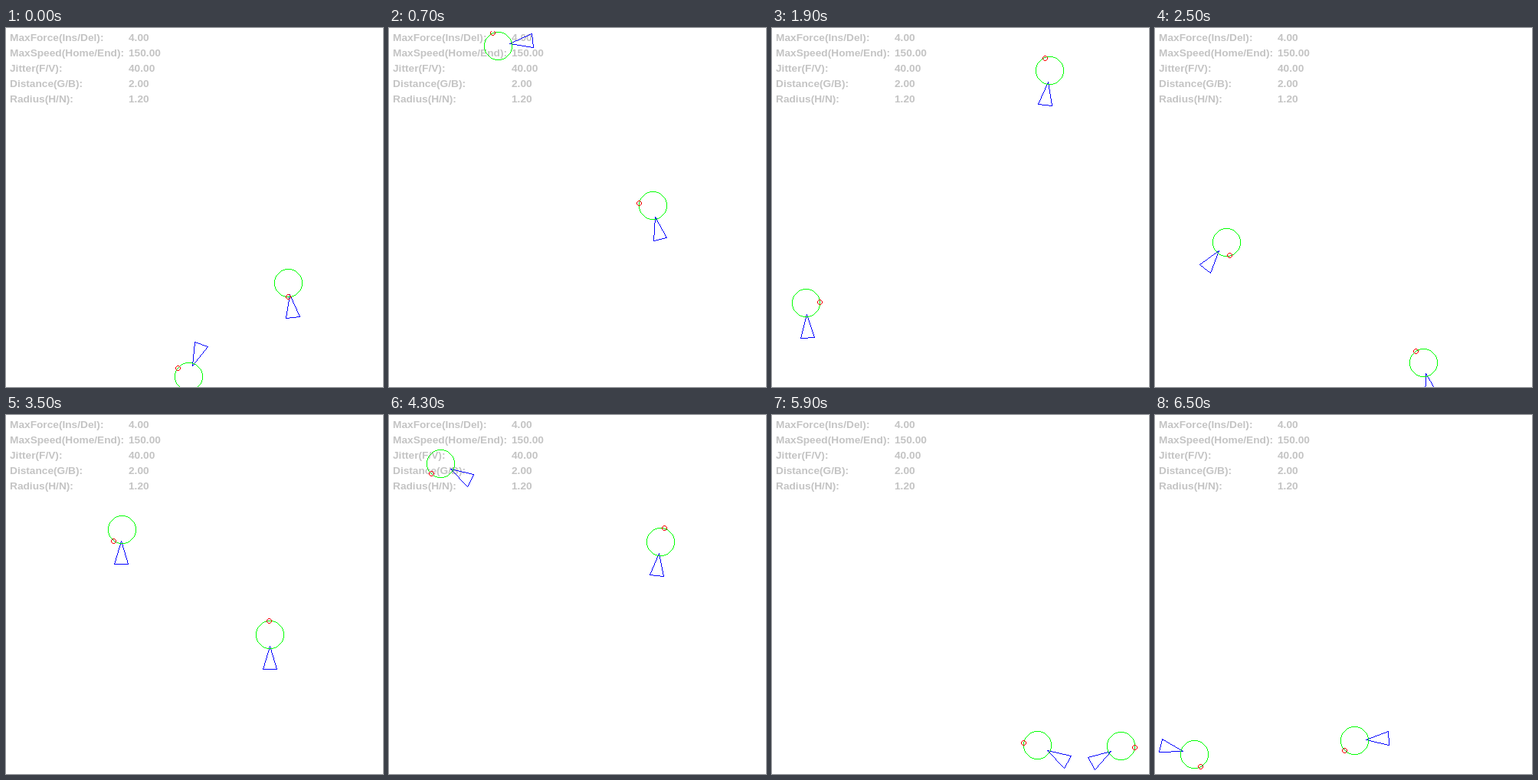
These frames come from a looping animation (492 by 468 pixels, 6.6 s). An HTML page with a canvas:

```html
<!DOCTYPE html>
<html lang="en">
<head>
<meta charset="utf-8">
<title>Wander steering</title>
<style>
  html, body { margin: 0; width: 100%; height: 100%; overflow: hidden; background: #fff; }
  svg, canvas { position: absolute; left: 0; top: 0; }
  text { font: bold 13.7px "Liberation Sans", Arial, sans-serif; fill: #c4c4c4; }
</style>
</head>
<body>
<svg id="labels" width="492" height="468"></svg>
<canvas id="stage" width="492" height="468"></canvas>
<script>
const W = 492, H = 468, TOP = 4, LOOP = 6600, STEP = 100;
const SPEED = 0.149, HALF = 15, WING = 9, RING = 18, DOT = 3;
const RAD = Math.PI / 180;
const ctx = document.getElementById("stage").getContext("2d");

const settings = {
  "MaxForce(Ins/Del):": "4.00",
  "MaxSpeed(Home/End):": "150.00",
  "Jitter(F/V):": "40.00",
  "Distance(G/B):": "2.00",
  "Radius(H/N):": "1.20"
};

// Each agent passes a few poses (x, y before wrapping, heading) at shared times.
// wander gives the dot's angle from the heading, with t in seconds.
const times = [0, 1400, 2500, 3500, 4300, 5200, 6500];
const agents = [
  {
    poses: [
      [372, 362, -97.6], [344.5, 159, -80.4], [357, -3, -103.5], [344, -152, -90],
      [350.5, -273.5, -84], [372.5, -407, -78.5], [513.5, -502, 14.5]
    ],
    wander: t => 17 * t - 62 - 110 * Math.exp(-2.5 * t)
  },
  {
    poses: [
      [249, 426, 112], [75, 455, 223], [74, 302, 308.7], [150.1, 179, 271],
      [93, 77.5, 209.5], [-31, 35, 211], [-202.5, -46, 176]
    ],
    wander: t => 205 - 135 * Math.cos(Math.PI * (t - 1.1) / 4.6)
  }
];

const wrap = (v, size) => ((v % size) + size) % size;

// Cubic between two values with end slopes m and n: returns value and slope
function hermite(p, q, m, n, u) {
  const c = 3 * (q - p) - 2 * m - n;
  const d = 2 * (p - q) + m + n;
  return [p + u * (m + u * (c + u * d)), m + u * (2 * c + 3 * u * d)];
}

function poseAt(poses, time) {
  let i = 0;
  while (i < times.length - 2 && time >= times[i + 1]) i++;
  const [x0, y0, a0] = poses[i], [x1, y1, a1] = poses[i + 1];
  const span = times[i + 1] - times[i];
  const u = (time - times[i]) / span;
  // End slopes sized so that a steady turn follows a circular arc
  const turn = Math.abs(a1 - a0) * RAD;
  const pull = SPEED * span * 4 * Math.tan(turn / 4) / turn;
  const along = (p, q, fn) => hermite(p, q, pull * fn(a0 * RAD), pull * fn(a1 * RAD), u);
  const [x, vx] = along(x0, x1, Math.cos);
  const [y, vy] = along(y0, y1, Math.sin);
  return { x: wrap(x, W), y: wrap(y, H), heading: Math.atan2(vy, vx) };
}

// Hard-edged one-pixel strokes
const plot = (x, y) => ctx.fillRect(Math.round(x), Math.round(y), 1, 1);

function line([x0, y0], [x1, y1]) {
  const n = Math.max(Math.abs(x1 - x0), Math.abs(y1 - y0)) || 1;
  for (let i = 0; i <= n; i++) plot(x0 + (x1 - x0) * i / n, y0 + (y1 - y0) * i / n);
}

function circle([cx, cy], r, color) {
  ctx.fillStyle = color;
  for (let a = 0; a <= r * Math.SQRT1_2 + 0.5; a++) {
    const b = Math.round(Math.sqrt(r * r - a * a));
    for (const sx of [-1, 1]) for (const sy of [-1, 1]) {
      plot(cx + sx * a, cy + sy * b);
      plot(cx + sx * b, cy + sy * a);
    }
  }
}

function drawAgent({ poses, wander }, time) {
  const { x, y, heading } = poseAt(poses, time);
  const hx = Math.cos(heading), hy = Math.sin(heading);
  const at = (ahead, side) => [
    Math.round(x + hx * ahead - hy * side),
    Math.round(y + hy * ahead + hx * side)
  ];
  const tip = at(HALF, 0), left = at(-HALF, -WING), right = at(-HALF, WING);
  ctx.fillStyle = "#00f";
  line(tip, left);
  line(left, right);
  line(right, tip);

  const swing = wander(time / 1000) * RAD;
  circle(at(2 * HALF, 0), RING, "#0f0");
  circle(at(2 * HALF + RING * Math.cos(swing), RING * Math.sin(swing)), DOT, "#f00");
}

function addText(str, x, y) {
  const el = document.createElementNS("http://www.w3.org/2000/svg", "text");
  el.setAttribute("x", x);
  el.setAttribute("y", y);
  el.textContent = str;
  document.getElementById("labels").appendChild(el);
}

Object.entries(settings).forEach(([name, value], row) => {
  addText(name, 5, 17 + 20 * row);
  addText(value, 160, 17 + 20 * row);
});

ctx.beginPath();
ctx.rect(0, TOP, W, H - TOP);
ctx.clip();
const start = performance.now();

function draw() {
  const now = Math.max(0, performance.now() - start) % LOOP;
  const time = Math.floor(now / STEP) * STEP;
  ctx.clearRect(0, 0, W, H);
  agents.forEach(agent => drawAgent(agent, time));
  requestAnimationFrame(draw);
}
draw();
</script>
</body>
</html>
```
